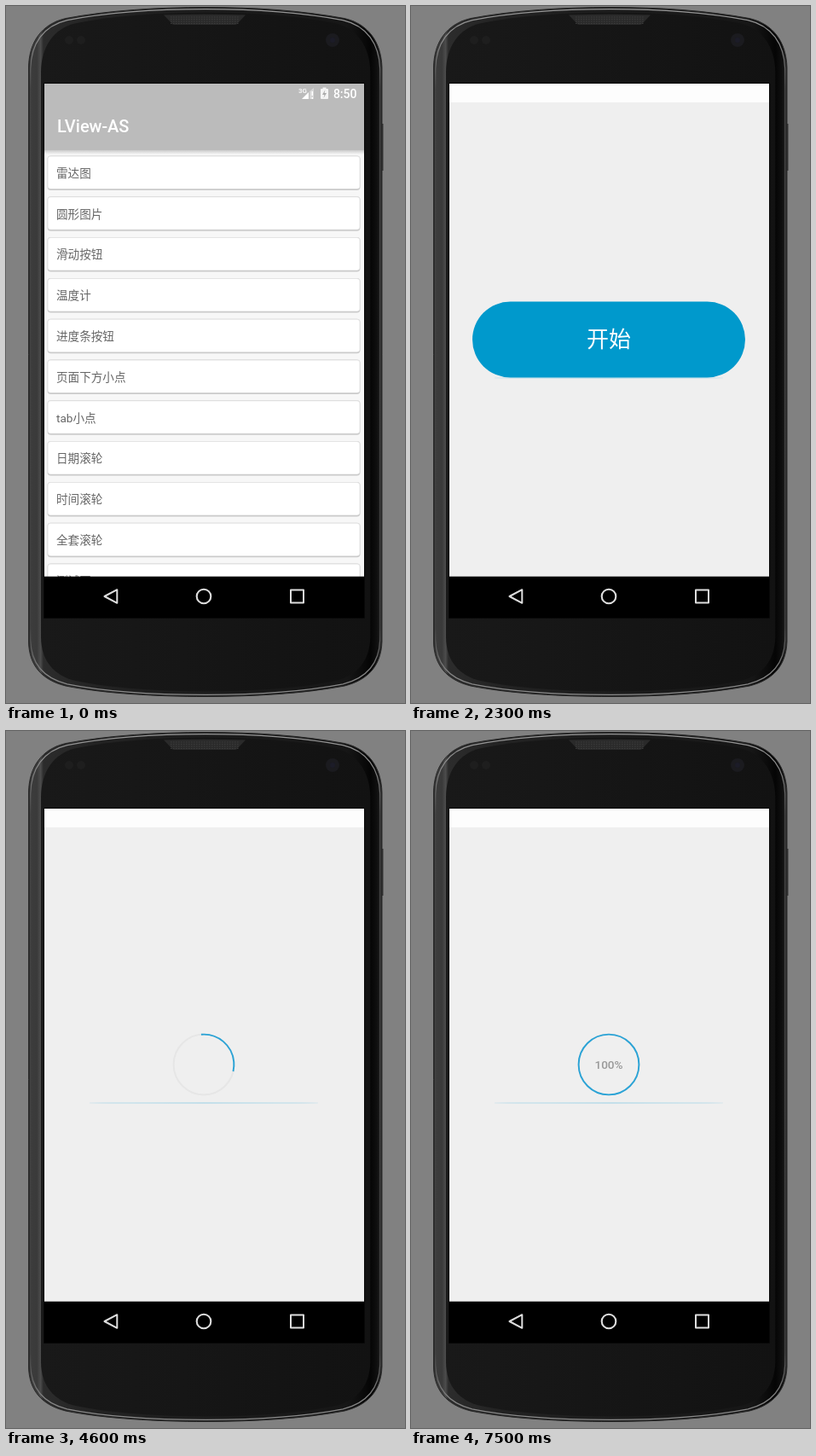
Recreate the animation shown at these times as an HTML page with a canvas. Size 468x817 px, loop 8 s.

```html
<!DOCTYPE html>
<html lang="zh">
<head>
<meta charset="utf-8">
<style>
html, body { margin: 0; width: 100%; height: 100%; overflow: hidden; background: #818181; }
canvas { display: block; }
</style>
</head>
<body>
<canvas width="468" height="817"></canvas>
<script>
const ctx = document.querySelector('canvas').getContext('2d');
const LOOP = 8000, STEP = 100;
const SCREEN = { x: 45, y: 91, w: 375, h: 626 };
const CENTER = { x: 232, y: 391 };
const NAV_TOP = 668.7, BLUE = '#0099cc';
const SANS = 'Roboto, "Noto Sans CJK SC", "Noto Sans CJK", sans-serif';
const ITEMS = ['雷达图', '圆形图片', '滑动按钮', '温度计', '进度条按钮', '页面下方小点',
  'tab小点', '日期滚轮', '时间滚轮', '全套滚轮', '测试图'];

// [time, half width of the start button]
const BUTTON = [[900, 6], [1100, 30], [1200, 30], [1300, 42], [1400, 58], [1500, 97],
  [1700, 178], [2200, 178], [2300, 160], [2600, 44.5], [2700, 26.3], [2800, 8], [2900, 0]];
// [time, degrees clockwise from the top]
const TAIL = [[3000, 0], [3500, 0], [3900, 60], [4600, 355], [4900, 433], [5300, 470],
  [5700, 689], [5900, 745], [6050, 783], [7400, 783]];
const HEAD = [[3000, 0], [3900, 237], [4600, 463], [4900, 475], [5300, 640],
  [5700, 760], [5900, 770], [6050, 805], [6600, 867], [7400, 1080]];

function valueAt(keys, t) {
  const i = keys.findIndex(k => k[0] >= t);
  if (i < 0) return keys[keys.length - 1][1];
  if (i === 0) return keys[0][1];
  const [t0, v0] = keys[i - 1], [t1, v1] = keys[i];
  return v0 + (v1 - v0) * (t - t0) / (t1 - t0);
}

function rect(x, y, w, h, color) {
  ctx.fillStyle = color;
  ctx.fillRect(x, y, w, h);
}

function roundRect(x, y, w, h, r, color) {
  ctx.beginPath();
  ctx.roundRect(x, y, w, h, r);
  ctx.fillStyle = color;
  ctx.fill();
}

function circle(x, y, r, fill, stroke, width = 1) {
  ctx.beginPath();
  ctx.arc(x, y, r, 0, 2 * Math.PI);
  if (fill) { ctx.fillStyle = fill; ctx.fill(); }
  if (stroke) { ctx.strokeStyle = stroke; ctx.lineWidth = width; ctx.stroke(); }
}

function text(str, x, y, size, color, weight = 400, align = 'left') {
  ctx.font = `${weight} ${size}px ${SANS}`;
  ctx.textAlign = align;
  ctx.fillStyle = color;
  ctx.fillText(str, x, y);
}

function fillPath(d, color) {
  ctx.fillStyle = color;
  ctx.fill(new Path2D(d));
}

function strokePath(d, color, width) {
  ctx.strokeStyle = color;
  ctx.lineWidth = width;
  ctx.stroke(d instanceof Path2D ? d : new Path2D(d));
}

function gradient(x0, y0, x1, y1, stops) {
  const g = ctx.createLinearGradient(x0, y0, x1, y1);
  stops.forEach(([at, color]) => g.addColorStop(at, color));
  return g;
}

const BODY = new Path2D('M26.5 72C27 42 42 21 70 14.5C120 5 180 1.5 234 1.5' +
  'C290 1.5 345 5 397 14.5C425 21 440 42 441 72V745C440 773 425 790 397 797' +
  'C350 806 290 809.5 234 809.5C178 809.5 115 806 70 797C42 790 27 773 26.5 745Z');

// The body outline shrunk towards a point, for rims and bevels.
function insetBody(scaleX, scaleY, centerX = 234) {
  const path = new Path2D();
  path.addPath(BODY, new DOMMatrix()
    .translate(centerX, 405).scale(scaleX, scaleY).translate(-centerX, -405));
  return path;
}
const RIM = insetBody(.989, .9945);
const FACE = insetBody(.932, .985, 240);

function drawPhone() {
  rect(0, 0, 468, 817, '#818181');
  rect(440, 138, 2.5, 55, '#333');
  ctx.fillStyle = gradient(26, 0, 442, 0, [[0, '#262626'], [.01, '#3c3c3c'], [.025, '#3a3a3a'],
    [.035, '#4c4c4c'], [.043, '#2c2c2c'], [.2, '#222'], [.9, '#161616'], [.965, '#050505'],
    [.985, '#101010'], [1, '#333']]);
  ctx.fill(BODY);
  strokePath(BODY, '#2a2a2a', 1);
  ctx.fillStyle = gradient(40, 0, 430, 0, [[0, '#191919'], [1, '#121212']]);
  ctx.fill(FACE);
  strokePath(RIM, gradient(0, 0, 0, 809, [[0, '#999'], [.05, '#8c8c8c'], [.12, '#484848'],
    [.9, '#444'], [.97, '#848484'], [1, '#8c8c8c']]), 1.2);

  fillPath('M185 10.5Q232 9 281 10.5L272 20Q271 22 267 22H199Q195 22 194 20Z', '#2a2a2a');
  ctx.setLineDash([1.5, 1.5]);
  for (let y = 13; y < 21; y += 2.5) strokePath(`M193 ${y}H273`, '#3c3c3c', 1);
  ctx.setLineDash([]);
  circle(74, 40, 5, '#1e1e1e');
  circle(88, 40, 5, '#1e1e1e');
  circle(383, 40, 8, '#1b1b1f');
  circle(383, 40, 3, '#1c1c28');
}

function drawNavBar() {
  rect(SCREEN.x, NAV_TOP, SCREEN.w, 717 - NAV_TOP, '#000');
  ctx.lineJoin = 'round';
  strokePath('M115.5 692L130.3 684.2V699.8Z', '#dedede', 2);
  circle(232, 692, 8.3, null, '#dedede', 2.1);
  strokePath('M334 684.5H349V699.5H334Z', '#dedede', 2);
}

function drawStatusIcons() {
  text('3G', 343, 102, 8, '#fff', 500);
  fillPath('M347 109L355 101V109Z', '#fff');
  fillPath('M356 100L361 96V109H356Z', 'rgba(255,255,255,.4)');
  rect(358.5, 100, 1.5, 5, '#fff');
  rect(358.5, 107, 1.5, 2, '#fff');
  roundRect(369, 97, 9, 12, 1, '#f4f4f4');
  rect(371.5, 95.5, 4, 2, '#f4f4f4');
  fillPath('M374.5 98L371 104H373.5L372.5 108L376 102H373.5Z', '#aaa');
  text('8:50', 411.5, 108, 14, '#fff', 500, 'right');
}

function drawList() {
  rect(SCREEN.x, SCREEN.y, SCREEN.w, 578, '#f7f7f7');
  ITEMS.forEach((label, i) => {
    const y = 176 + i * 47.8;
    roundRect(48.5, y - .5, 367, 40.5, 4, '#cacaca');
    roundRect(48.5, y - .5, 367, 39, 4, '#e4e4e4');
    roundRect(49.5, y + .5, 365, 37.5, 3, '#fff');
    text(label, 59, y + 24.8, 13.6, '#666');
  });
  rect(SCREEN.x, 169, SCREEN.w, 5, gradient(0, 169, 0, 174, [[0, '#ccc'], [1, '#f7f7f7']]));
  rect(SCREEN.x, SCREEN.y, SCREEN.w, 78, '#bbb');
  drawStatusIcons();
  text('LView-AS', 60, 148, 20, '#fff', 500);
}

function drawButton(t) {
  const half = valueAt(BUTTON, t);
  if (half <= 0) return;
  const r = Math.min(half, 44.5);
  roundRect(CENTER.x - half, CENTER.y - r, 2 * half, 2 * r, r, BLUE);
  if (half > 50) text('开始', CENTER.x, 399.5, 26, '#fff', 400, 'center');
}

function drawRing(t) {
  const r = 35.4, color = '#2aa3d6', width = 1.9;
  circle(CENTER.x, CENTER.y, r, null, '#e6e6e6', 2);
  if (t >= 7500) {
    circle(CENTER.x, CENTER.y, r, null, color, width);
    text('100%', CENTER.x, 396, 13.6, '#999', 500, 'center');
    return;
  }
  if (t <= 3000) return;
  const rad = deg => (deg - 90) * Math.PI / 180;
  ctx.beginPath();
  ctx.arc(CENTER.x, CENTER.y, r, rad(valueAt(TAIL, t)), rad(valueAt(HEAD, t)));
  ctx.strokeStyle = color;
  ctx.lineWidth = width;
  ctx.stroke();
}

function drawButtonPage(t) {
  rect(SCREEN.x, SCREEN.y, SCREEN.w, 578, '#efefef');
  rect(SCREEN.x, SCREEN.y, SCREEN.w, 22, '#fdfdfd');
  if (t >= 2300) {
    rect(98, 435.5, 268, 1, gradient(98, 0, 366, 0, [[0, 'rgba(120,195,225,.2)'],
      [.15, '#b4dae9'], [.5, '#98cfe4'], [.85, '#b4dae9'], [1, 'rgba(120,195,225,.2)']]));
  }
  drawButton(t);
  if (t >= 2900) drawRing(t);
}

function draw(t) {
  drawPhone();
  ctx.save();
  ctx.beginPath();
  ctx.rect(SCREEN.x, SCREEN.y, SCREEN.w, SCREEN.h);
  ctx.clip();
  const enter = Math.min((t - 900) / 200, 1);
  if (t < 1100) drawList();
  drawNavBar();
  if (t >= 900) {
    ctx.globalAlpha = .52 + .48 * enter;
    ctx.translate(0, Math.round(27 * (1 - enter) ** 1.5));
    drawButtonPage(t);
  }
  ctx.restore();
  if (enter === 1) drawNavBar();
  if (t >= 700 && t < 1000) circle(185.5, 382.5, 11, 'rgba(255,255,255,.5)', '#e2e2e2');
  strokePath('M44.5 90.5H420.5V717.5H44.5Z', '#080808', 1);
}

const start = performance.now();
function frame() {
  const t = (performance.now() - start) % LOOP;
  draw(Math.floor(t / STEP) * STEP);
  requestAnimationFrame(frame);
}
frame();
</script>
</body>
</html>
```
